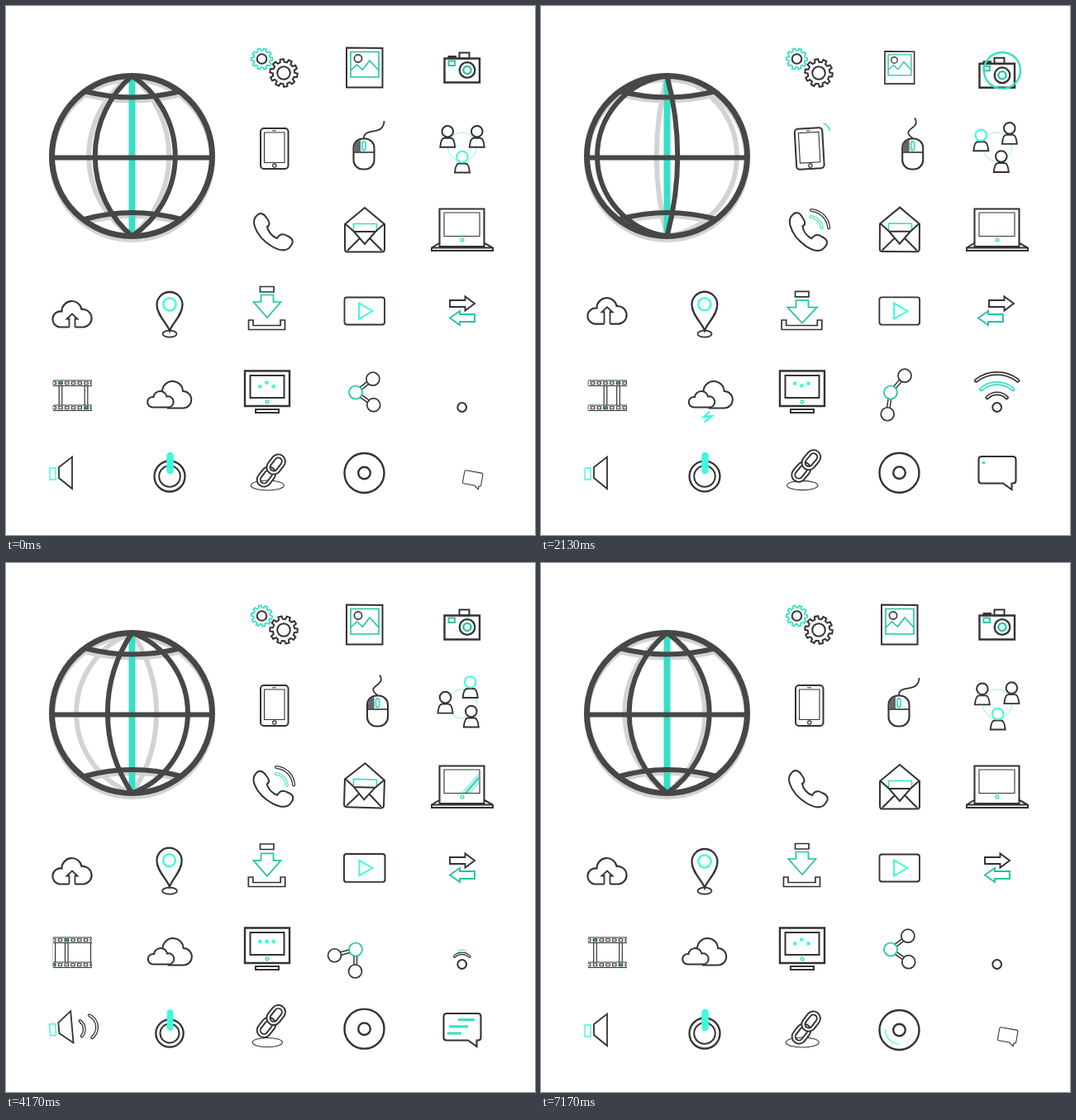
An HTML page with a canvas that plays this animation: 640x640 px, repeating every 7.21 s.

```html
<!DOCTYPE html>
<html lang="en">
<head>
<meta charset="utf-8">
<title>Icons</title>
<style>
html, body { margin: 0; width: 100%; height: 100%; overflow: hidden; background: #fff; }
canvas { display: block; width: 640px; height: 640px; }
</style>
</head>
<body>
<canvas id="stage" width="640" height="640"></canvas>
<script>
const c = document.getElementById('stage').getContext('2d');
const LOOP = 7210, TAU = Math.PI * 2, RAD = Math.PI / 180;
const DARK = '#333', GLOBE = '#474747', SHADE = '#d3d3d3';
const TEAL = '#36dfc4', BRIGHT = '#3dfbdc', DEEP = '#22c3a3';
let t = 0;

// Progress of t between two times, plain and eased
const ramp = (a, b) => Math.min(1, Math.max(0, (t - a) / (b - a)));
const ease = (a, b) => ramp(a, b) ** 2 * (3 - 2 * ramp(a, b));
// Rise from a to b, hold, fall from d to e
const pulse = (a, b, d, e) => ease(a, b) - ease(d, e);
const hop = () => pulse(900, 1330, 1500, 2200) + pulse(4000, 4750, 5350, 6350);

function paint(path, color, w, fill) {
  if (fill) { c.fillStyle = fill; c.fill(path); }
  if (w > 0) { c.strokeStyle = color; c.lineWidth = w; c.stroke(path); }
}
const draw = (d, color = DARK, w = 2, fill) => paint(new Path2D(d), color, w, fill);
const line = (x0, y0, x1, y1, color, w) => draw(`M${x0} ${y0}L${x1} ${y1}`, color, w);

function ring(x, y, r, color = DARK, w = 2, fill, ry = r) {
  const p = new Path2D();
  p.ellipse(x, y, r, ry, 0, 0, TAU);
  paint(p, color, w, fill);
}
function arc(x, y, r, a0, a1, color, w) {
  const p = new Path2D();
  p.arc(x, y, r, a0 * RAD, a1 * RAD);
  paint(p, color, w);
}
function box(x0, y0, x1, y1, r = 0, color = DARK, w = 2, fill) {
  const p = new Path2D();
  p.roundRect(x0, y0, x1 - x0, y1 - y0, r);
  paint(p, color, w, fill);
}
// Hollow curved band
function band(x, y, r, a0, a1, color, w = 4, gap = 1.5) {
  c.lineCap = 'round';
  arc(x, y, r, a0, a1, color, w);
  arc(x, y, r, a0, a1, '#fff', gap);
  c.lineCap = 'butt';
}
// Run fn scaled and turned about (x, y), moved by (dx, dy)
function turn(x, y, deg, sx, sy, fn, dx = 0, dy = 0) {
  c.save();
  c.translate(x + dx, y + dy);
  c.rotate(deg * RAD);
  c.scale(sx, sy);
  c.translate(-x, -y);
  fn();
  c.restore();
}
const shift = (dx, dy, fn) => turn(0, 0, 0, 1, 1, fn, dx, dy);
function fade(alpha, fn) {
  if (alpha <= 0) return;
  c.globalAlpha = alpha;
  fn();
  c.globalAlpha = 1;
}
function clip(x, y, w, h, fn) {
  c.save();
  c.beginPath();
  c.rect(x, y, w, h);
  c.clip();
  fn();
  c.restore();
}
function polygon(n, point) {
  const p = new Path2D();
  for (let i = 0; i < n; i++) {
    const [x, y, r, a] = point(i);
    p.lineTo(x + r * Math.cos(a), y + r * Math.sin(a));
  }
  p.closePath();
  return p;
}

function globe() {
  const x = 152.5, r = 97;
  const offsets = [5270, 1665].map(start => r * (2 * ((t - start + LOOP) % LOOP) / LOOP - 1));
  // Circular arc from pole to pole that bulges sideways by d
  const meridian = (d, color) => {
    const R = Math.min(1e5, (r * r + d * d) / (2 * Math.abs(d) + 1e-6));
    draw(`M${x} 84.5A${R} ${R} 0 0 ${d > 0 ? 1 : 0} ${x} 278.5`, color, 6);
  };
  const caps = color => {
    ring(x, 181.5, r, color, 7);
    draw('M95 103Q152 118 212 103M95 258Q152 242 212 258', color, 6);
  };
  shift(0, 4, () => caps(SHADE));
  for (const d of offsets) meridian(-d, SHADE);
  line(x, 86, x, 277, TEAL, 8);
  for (const d of offsets) meridian(d, GLOBE);
  line(55, 183.5, 250, 183.5, GLOBE, 6);
  caps(GLOBE);
}

function gear(x, y, r, deg, color, w, hole) {
  const n = 10, sides = [-.3, -.2, .2, .3];
  const teeth = polygon(n * 4, i => {
    const side = sides[i % 4];
    return [x, y, Math.abs(side) > .25 ? r * .79 : r, (Math.floor(i / 4) + side) * TAU / n + deg * RAD];
  });
  paint(teeth, color, w);
  ring(x, y, hole, DARK, 2);
}
function gears() {
  const deg = 360 * t / LOOP;
  gear(309.5, 64, 12.8, -deg, TEAL, 1.7, 5.8);
  gear(336, 81, 16.8, deg + 10, DARK, 2, 7.8);
}

function photo() {
  const s = 1 - .27 * pulse(1000, 1400, 1900, 2500) + .12 * pulse(2500, 2800, 2950, 3500);
  turn(434, 74.5, 0, s, s, () => {
    draw('M412 50.5L455.5 51V98.5H412Z', DARK, 2);
    box(417, 55.5, 451, 86, 0, DEEP, 1.6);
    ring(426, 63.5, 4.6, DARK, 1.6);
    draw('M417 78L424.5 71L431.5 77L440 66L451 78', DEEP, 1.6);
  });
  if (t < 2500 || t > 3400) return;
  const r0 = 28 + 22 * ramp(2500, 3400), r1 = 28 + 22 * ease(2400, 3000);
  for (let i = 0; i < 8; i++) {
    const a = i * TAU / 8, e = i % 2 * 8, cx = Math.cos(a), cy = Math.sin(a);
    line(432.5 + cx * (r0 + e), 75 + cy * (r0 + e), 432.5 + cx * (r1 + e), 75 + cy * (r1 + e), DEEP, 2);
  }
}

function camera() {
  const tilt = 5 * pulse(1100, 1400, 1450, 1800) - 4 * pulse(4900, 5250, 5300, 5650);
  const dip = 8 * (pulse(1100, 1400, 1500, 3600) + pulse(4900, 5250, 5350, 6700));
  const knob = 3 - 3 * pulse(2900, 3600, 5500, 6600);
  turn(552, 78, tilt, 1, 1, () => {
    box(530.5, 63.5, 573, 92.5, 0, DARK, 2.4);
    box(548.5, 56.5, 560.5, 63.5);
    c.fillStyle = DARK;
    c.fillRect(534.5, 63 - knob, 10.5, knob);
    box(535.5, 66.5, 543, 72, 0, DEEP, 1.8);
    ring(558, 77.5, 9.3, DARK, 2.3);
    ring(558, 77.5, 4.6, DEEP, 2.3);
  }, 0, dip);
  for (const start of [1300, 5100]) {
    const p = ramp(start, start + 1700);
    if (p > 0) fade(1 - p ** 6, () => ring(558, 78, 7 + 21.5 * Math.sqrt(p), TEAL, 2.5 * (1 - p ** 4)));
  }
}

function phone() {
  const shake = pulse(1250, 1400, 1900, 2400) + pulse(5300, 5450, 5750, 5950);
  turn(325, 173, 7 * shake * Math.cos((t - 1430) / 70), 1, 1, () => {
    box(308, 148, 341.5, 197, 4, DARK, 2);
    box(312.5, 153, 337, 189.5, 0, DARK, 1.1);
    ring(324.8, 193, 2.2, DARK, 1.2);
    line(322, 150.8, 327, 150.8, DARK, 1);
  });
  fade(pulse(1250, 1800, 2870, 3100) + pulse(5000, 5400, 5800, 6250),
    () => arc(338, 153, 11.5, -72, -10, TEAL, 1.5));
}

function mouse() {
  const p = pulse(0, 1800, 4000, 6600), x = 433 + 16.7 * p, mix = (a, b) => a + (b - a) * p;
  draw(`M${x} 160C433 ${mix(146, 148)} ${mix(457, 461)} ${mix(158, 149)} ${mix(457.5, 452)} ${mix(139, 135.5)}`, DARK, 1.8);
  box(x - 12.5, 160.5, x + 12.5, 197.5, 11, DARK, 2.1);
  draw(`M${x - 4} 162V176.5H${x - 11.5}V171Q${x - 11} 163 ${x - 4} 162Z`, DARK, 0, '#666');
  line(x - 12.5, 177, x + 12.5, 177, DARK, 1.6);
  box(x - 2, 164, x + 2, 174.5, 2, TEAL, 1.8, '#fff');
}

function people() {
  fade(.5, () => ring(552, 170.5, 17.5, TEAL, 1));
  for (let i = 0; i < 3; i++) {
    const a = TAU * (.25 + i / 3 + t / LOOP);
    shift(552 + 20.5 * Math.cos(a), 162 + 20.5 * Math.sin(a), () => {
      draw('M-9 19Q-8 8 -4 8H4Q8 8 9 19Z', DARK, 1.9, '#fff');
      ring(0, 0, 6.8, i ? DARK : BRIGHT, 2, '#fff');
    });
  }
}

function call() {
  const s = pulse(600, 1100, 6300, 6900);
  turn(324, 274, 4 * s * Math.cos((t - 1430) / 120), 1, 1, () =>
    draw('M303 254C307 249 312 251 315 256C319 261 320 265 316 267C317 273 322 279 328 281C331 276 335 275 340 278C347 281 349 285 344 291C339 298 331 296 322 291C312 285 304 276 301 267C299 261 300 257 303 254Z', DARK, 2));
  if (s > .02) turn(338, 258, 0, s, s, () => {
    band(325, 270, 23.2, -85, -4, DARK);
    band(325, 270, 15, -85, -4, TEAL, 3.6);
  });
}

function envelope() {
  const h = hop();
  turn(434, 271, 13 * h, 1, 1, () => {
    draw('M410 264L434 244L458 264V294Q458 297.5 455 297.5H413Q410 297.5 410 294Z', DARK, 2);
    draw('M420.5 273V263.5H448.5V273', TEAL, 1.6);
    draw('M411 264L421 273L434 288L447 273L457 264M421 273H447M413 296L428 281M455 296L440 281', DARK, 2);
  }, -2 * h, -13 * h);
}

function laptop() {
  box(524.5, 245.5, 578.5, 291, 0, DARK, 2.1);
  box(530, 250, 573, 278.5, 0, DARK, 1.1);
  if (t > 2600 && t < 4500) clip(530.5, 250.5, 42, 27.5, () => {
    const x = 532 + 36 * (t - 2870) / 1300;
    for (const [o, w] of [[-4, 1], [0, 3], [5, 1]])
      line(x + o - 15, 282, x + o + 15, 247, TEAL, w);
  });
  ring(552, 283, 1.9, TEAL, 1.4);
  draw('M524 287L515 292.5V296H589V292.5L579 287M515 292.5H589', DARK, 2);
}

function upload() {
  const up = pulse(900, 1400, 1500, 3600) + pulse(4500, 5100, 6030, 6700), y = 372.5 - 5.5 * up;
  shift(0, -5 * up, () => {
    draw('M76.5 388.5H64.5A9.4 9.4 0 1 1 67.5 369.5A12.1 12.1 0 0 1 91.5 367A10.6 10.6 0 1 1 94 388.5H83.5', DARK, 2.1);
    draw(`M76.5 388.5V${y + 6}H73.5L80 ${y}L86.5 ${y + 6}H83.5V388.5`, DARK, 1.8);
  });
}

function pin() {
  const h = hop();
  ring(198, 396.7, 8.5 + 3.5 * h, DARK, 1.7, null, 4);
  turn(198, 393, -5.5 * h, 1 - .2 * h, 1, () => {
    draw('M198 393C195 384 182.5 374 182.5 361.5A15.5 15.5 0 1 1 213.5 361.5C213.5 374 201 384 198 393Z', DARK, 2.3, '#fff');
    ring(198, 361, 7.6, BRIGHT, 2.4);
  }, -.5 * h, -10 * h);
  if (h > .8) {
    draw('M179.5 368Q187 372 194 372', BRIGHT, 2);
    draw('M203 381.5Q211 381 218 377.5', DARK, 2);
  }
}

function download() {
  const d = pulse(800, 2500, 2900, 4800), lag = d * d, y = 7.5 * d, w = 3 * lag;
  box(307.5, 339.5 + 7.5 * lag, 324, 346 + 7.5 * lag, 0, DARK, 1.7);
  draw(`M308.5 ${349.5 + y}H323.5V${358 + y}H${332.5 + w * .6}L316 ${377 + y}L${299.5 - w * .6} ${358 + y}H308.5Z`, DEEP, 1.7);
  draw(`M${293.5 - w} 380H${299 - w}V386.5H${332 + w}V380H${337.5 + w}V391.5H${293.5 - w}Z`, DARK, 1.7);
}

function video() {
  const h = hop(), k = 4.3 * h;
  box(409.5, 352.5, 458, 385.5, 2, TEAL, .9);
  box(409.5 - k, 352.5 - k * .8, 458 + k, 385.5 + k * .7, 3, DARK, 1.8 + .5 * h);
  const deg = 120 * (ease(900, 1900) + ease(4700, 6600));
  const play = polygon(3, i => [432.5 + 1.5 * h, 369, 11 - 3.2 * h, (deg + i * 120) * RAD]);
  paint(play, BRIGHT, 2 - .6 * h);
}

function swap() {
  const s = pulse(900, 1400, 2900, 3600);
  shift(5 * s, 0, () => draw('M537 356H555.5V351.5L567 360L555.5 368.5V364H537Z', DARK, 1.9));
  shift(-8 * s, 0, () => draw('M567 373H549V369L537 377.5L549 386V382H567Z', DEEP, 1.9));
}

function film() {
  const span = 46.5, step = span / 6, a = 40 + 93 * t / LOOP % span;
  clip(56.5, 450, 47.5, 42, () => {
    draw('M57 453H104M57 459.5H104M57 483H104M57 489.5H104', DARK, 1.2);
    for (let x = 57 + (a - span + span) % span - span; x < 150; x += span) {
      for (const b of [x, x + 2 * step])
        draw(`M${b - 1.8} 460V483M${b + 1.8} 460V483`, DARK, 1.2);
      for (let i = 0; i < 6; i++) {
        const h = x + i * step;
        box(h - 2.2, 454.8, h + 2.2, 457.8, 0, DARK, 1.1, i === 2 ? DEEP : '#fff');
        box(h - 2.2, 484.8, h + 2.2, 487.8, 0, DARK, 1.1, i === 0 ? DEEP : '#fff');
      }
    }
  });
}

function storm() {
  const x = 9.5 * pulse(800, 1400, 1450, 3800) + 10.5 * pulse(4000, 5200, 5300, 7000);
  shift(x, 0, () => {
    draw('M189 467A12.3 12.3 0 0 1 214 466A10.2 10.2 0 1 1 214 486.5H195', DARK, 2);
    draw('M178 485.5A6.3 6.3 0 1 1 178.5 473A8.1 8.1 0 0 1 194.5 472.5A6.6 6.6 0 1 1 196 485.5Z', DARK, 2, '#fff');
  });
  const len = 31.5;
  for (const start of [1270, 4600]) {
    const from = ease(start + 700, start + 2050), to = ease(start, start + 400);
    if (to > from) shift(x - 10.5, 4 * from, () => {
      c.setLineDash([len * (to - from), 99]);
      c.lineDashOffset = -len * from;
      draw('M208 490L200 497L209.5 496L201 503.5', BRIGHT, 2.4);
    });
  }
}

function monitor() {
  box(289, 441.5, 343, 484, 0, DARK, 2.4);
  box(295.5, 447, 336.5, 474, 0, DARK, 2);
  box(302, 488, 330, 492, 0, DARK, 2);
  ring(316, 479, 1.8, TEAL, 1.4);
  const w = 1 - 2 * ease(700, 1300) + ease(1500, 2870) - ease(5300, 5900) + 2 * ease(6100, 7000);
  for (const i of [-1, 0, 1])
    ring(315.4 + 8.2 * i, 458 + 2.4 * w * (i ? 1 : -1), 2.4, '', 0, BRIGHT);
}

function share() {
  const spin = 360 * ease(3200, 5600);
  const angles = [
    spin - 38 - 25 * pulse(1430, 2870, 3000, 3600),
    spin + 35 + 79 * pulse(700, 1400, 1500, 3700)
  ];
  for (const deg of angles) {
    const x = 423 + 26.5 * Math.cos(deg * RAD), y = 467.5 + 26.5 * Math.sin(deg * RAD);
    line(423, 467.5, x, y, DARK, 5);
    line(423, 467.5, x, y, '#fff', 2);
    ring(x, y, 8, DARK, 1.7, '#fff');
  }
  ring(423, 467.5, 8, DEEP, 1.7, '#fff');
}

function wifi() {
  ring(551.7, 485.5, 5.4, DARK, 2);
  for (let i = 0; i < 3; i++) {
    const r = 17 + 12 * i, half = 45 - 3.5 * i, d = 350 * i;
    const s = pulse(200 + d, 1100 + d, 2000 + d, 3500 + d) + pulse(3500 + d, 4500 + d, 5150 + d, 6450 + d);
    if (s > .02) turn(551.7, 500.5 - r, 0, s, s, () =>
      band(551.7, 485.5, r, -90 - half, -90 + half, i === 1 ? TEAL : DARK, 5));
  }
}

function speaker() {
  const p = pulse(2870, 4170, 4170, 4700), s = pulse(2200, 2700, 4300, 4800);
  turn(70, 566, -5 * p, 1, 1, () => {
    box(53, 559, 60, 573, 0, BRIGHT, 1.4);
    draw('M64 558L80 545.5V584L64 571Z', DARK, 1.8);
  }, 0, -2.5 * p);
  if (s > .02) turn(80, 567, -7 * p, s, s, () => {
    band(78, 569, 12.5, -48, 48, DARK);
    band(90, 568, 14 + 2 * p, -58, 58, DARK);
  }, 4 * p, -5 * p);
}

function power() {
  const s = 1 - .1 * (pulse(900, 1250, 1500, 2200) + pulse(3800, 4170, 4200, 4600));
  for (const start of [1100, 4350]) {
    const u = ramp(start, start + 950), left = (1 - u) ** 2;
    if (u > 0 && u < 1) ring(198, 568.5, 28.2 - 10.2 * left, GLOBE, .6 + 5 * left);
  }
  ring(198, 569, 18.5 * s, DARK, 2.3);
  ring(198, 569, 12.8 * s, DARK, 2);
  c.lineCap = 'round';
  line(198.5, 544, 198.5, 562, BRIGHT, 8.5 * s);
  c.lineCap = 'butt';
}

function chain() {
  const lift = 5 * pulse(1000, 1800, 6200, 7100) + 20 * hop();
  const tilt = 18 * pulse(900, 1400, 1450, 2300) - 6 * pulse(4600, 5250, 5300, 5900);
  const y = 562 - lift;
  ring(316.3, 580, 20 - lift * .24, DARK, 1.1, null, 6 - lift * .06);
  turn(320.8, y, -52 + tilt, 1, 1, () => {
    for (const x of [311.3, 330.3])
      for (const [color, w] of [[DARK, 6], ['#fff', 2.2]])
        box(x - 11, y - 6.5, x + 11, y + 6.5, 6.5, color, w);
  });
  if (t > 1200 && t < 1700) arc(318.5, 541, 21.5, 18, 102, BRIGHT, 1.8);
  if (t > 5000 && t < 5600) arc(320.5, 541, 19, 195, 262, BRIGHT, 1.8);
}

function disc() {
  const y = 565 - 10.3 * hop();
  const w = Math.abs(Math.cos(Math.PI * (ease(1100, 2000) + ease(4300, 6000))));
  turn(433.5, y, 0, Math.max(w, .05), 1, () => {
    ring(433.5, y, 24, DARK, 2.4);
    ring(433.5, y, 7.3, DARK, 2.4);
  });
  const a = .15 * (t - 2870) + 150 * ramp(4000, 5000) + 70;
  fade(pulse(2300, 2600, 3400, 3700) + pulse(6500, 6800, 7150, 7205), () => {
    arc(433.5, y, 16.8, a - 55, a + 40, BRIGHT, 1.8);
    arc(433.5, y, 16.5, a - 140, a - 85, BRIGHT, .5);
  });
}

function speech() {
  const p = pulse(600, 1200, 6300, 6950), s = .5 + .5 * p;
  turn(573, 585, 10 * (1 - p), s, s, () =>
    draw('M533 545H571Q574.5 545 574.5 549V574Q574.5 577.5 571 577.5H569.5V585L559 577.5H533Q529.5 577.5 529.5 574V549Q529.5 545 533 545Z', DARK, 2.1));
  for (let i = 0; i < 3; i++) {
    const start = 1900 + 550 * i, y = 552.6 + 8.2 * i;
    const x0 = 534 + 35 * ramp(start + 1600, start + 3400), x1 = 534 + 35 * ramp(start, start + 2400);
    if (x1 > x0) line(x0, y, x1, y, TEAL, 3);
  }
}

const icons = [globe, gears, photo, camera, phone, mouse, people, call, envelope, laptop, upload, pin,
  download, video, swap, film, storm, monitor, share, wifi, speaker, power, chain, disc, speech];

function frame() {
  t = performance.now() % LOOP;
  c.fillStyle = '#fff';
  c.fillRect(0, 0, 640, 640);
  for (const icon of icons) icon();
  requestAnimationFrame(frame);
}
frame();
</script>
</body>
</html>
```
